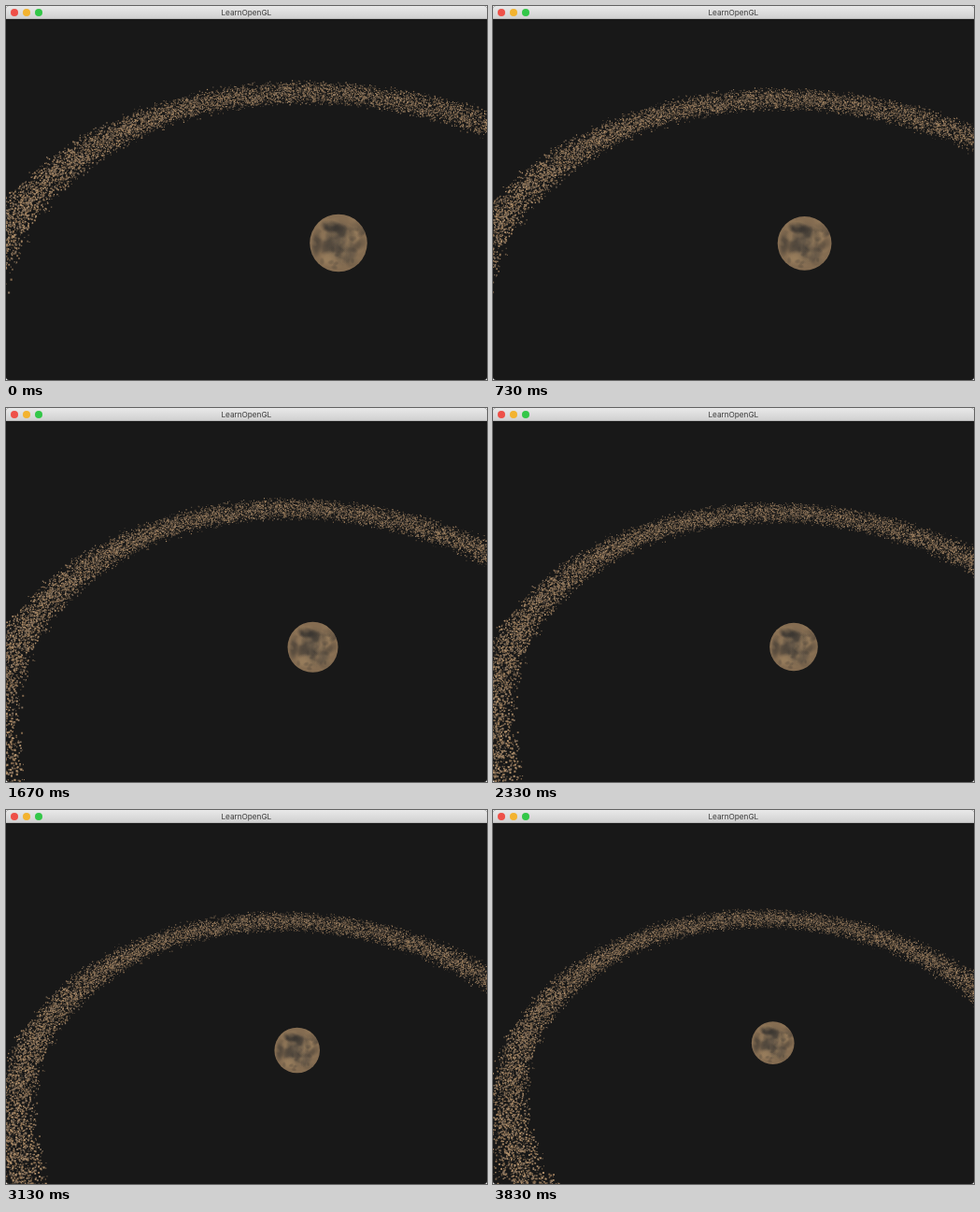
These frames come from a looping animation (515 by 400 pixels, 4010 ms). An HTML page with a canvas:

```html
<!DOCTYPE html>
<html lang="en">
<head>
<meta charset="utf-8">
<title>LearnOpenGL</title>
<style>
  html, body { margin: 0; width: 100%; height: 100%; overflow: hidden; background: #fff; }
  canvas { display: block; width: 515px; height: 400px; }
</style>
</head>
<body>
<canvas id="stage" width="515" height="400"></canvas>
<script>
const W = 515, H = 400, BAR = 14, LOOP = 4010;
const CX = W / 2, CY = (H + BAR) / 2;
const FOCAL = (H - BAR) / 2 / Math.tan(Math.PI / 8);
const RING = 50, SPREAD = 2.6, THICKNESS = 2.1, ROCKS = 20000;
const PLANET_RADIUS = 4.43, PLANET_DROP = 3;
const ctx = document.getElementById('stage').getContext('2d');

// time, planet x, planet y, planet diameter, camera elevation in degrees
const poses = [
  [0, 356, 253.5, 61.5, 41.6],
  [382, 335, 251.7, 59.2, 41.8],
  [1130, 331.8, 256.5, 56, 42.1],
  [1670, 328.5, 255.8, 54, 42.2],
  [2332, 322, 255.5, 51.6, 42.3],
  [3086, 311.7, 257, 48.6, 42.5],
  [3830, 299.7, 249.2, 45.7, 42.9]
];

// start, end and number of picture changes in each run of movement
const runs = [
  [70, 570, 9], [630, 1130, 7], [1200, 1470, 5], [1670, 2100, 8],
  [2270, 2770, 9], [2800, 3230, 7], [3400, 3830, 6]
];

function heldTime(t) {
  let held = 0;
  for (const [start, end, count] of runs) {
    if (t < start) break;
    const step = (end - start) / (count - 1);
    const k = Math.min(count - 1, Math.floor((t - start) / step + 0.1));
    held = start + k * step;
  }
  return held;
}

function poseAt(t) {
  let i = 0;
  while (i < poses.length - 2 && t >= poses[i + 1][0]) i++;
  const a = poses[i], b = poses[i + 1];
  const p = Math.min(1, (t - a[0]) / (b[0] - a[0]));
  return a.map((v, j) => v + (b[j] - v) * p);
}

let seed = 20117;
function random() {
  seed = (seed * 1664525 + 1013904223) >>> 0;
  return seed / 4294967296;
}
const jitter = amount => (random() * 2 - 1) * amount;

const shades = ['#6b5945', '#84694d', '#9a7c5c', '#b0906c', '#86725e'];
const rocks = Array.from({ length: ROCKS }, (_, i) => {
  const angle = i / ROCKS * Math.PI * 2;
  return {
    x: Math.sin(angle) * RING + jitter(SPREAD),
    y: jitter(THICKNESS),
    z: Math.cos(angle) * RING + jitter(SPREAD),
    size: 0.1 + random() * 0.18,
    shade: Math.floor(random() * shades.length)
  };
}).sort((a, b) => a.shade - b.shade);

// Camera whose view puts the planet at the given place and size.
function cameraFor([, px, py, diameter, degrees]) {
  const u = (px - CX) / FOCAL, v = (CY - py) / FOCAL;
  const n = Math.hypot(1, u, v);
  const elevation = degrees * Math.PI / 180;
  const distance = 2 * FOCAL * PLANET_RADIUS / diameter * n;
  const pitch = -Math.asin(n * Math.sin(elevation) / Math.hypot(1, v)) - Math.atan(v);
  const yaw = Math.atan2(u, Math.cos(pitch) - v * Math.sin(pitch));
  return {
    height: distance * Math.sin(elevation) - PLANET_DROP,
    back: distance * Math.cos(elevation),
    sinP: Math.sin(pitch), cosP: Math.cos(pitch),
    sinY: Math.sin(yaw), cosY: Math.cos(yaw)
  };
}

function drawRing(cam) {
  let shade = -1;
  for (const r of rocks) {
    const ahead = cam.back - r.z, rise = r.y - cam.height;
    const right = ahead * cam.sinY + r.x * cam.cosY;
    const forward = ahead * cam.cosY - r.x * cam.sinY;
    const depth = forward * cam.cosP + rise * cam.sinP;
    if (depth < 1) continue;
    const k = FOCAL / depth;
    const x = CX + right * k;
    const y = CY - (rise * cam.cosP - forward * cam.sinP) * k;
    if (x < -3 || x > W + 3 || y < BAR - 3 || y > H + 3) continue;
    if (r.shade !== shade) ctx.fillStyle = shades[shade = r.shade];
    const s = r.size * k;
    ctx.fillRect(x - s / 2, y - s / 2, s, s);
  }
}

const DARK = '48,46,44', GREY = '84,76,66', LIGHT = '158,130,95';

// x, y, width, height, tilt in planet radii, then colour and strength
const patches = [
  [0, 0, 0.55, 0.7, 0, GREY, 0.7],
  [-0.23, -0.56, 0.36, 0.2, 0.2, DARK, 0.95],
  [0.12, -0.42, 0.18, 0.26, -0.4, DARK, 0.6],
  [-0.75, 0, 0.17, 0.45, 0.1, DARK, 0.6],
  [-0.4, 0.1, 0.22, 0.3, 0.6, DARK, 0.5],
  [0.05, 0.3, 0.16, 0.4, 0.2, DARK, 0.4],
  [0.4, 0.45, 0.2, 0.3, 0.7, GREY, 0.5],
  [-0.3, 0.55, 0.32, 0.25, 0.1, LIGHT, 0.75],
  [0.48, -0.22, 0.26, 0.34, 0.4, LIGHT, 0.75],
  [-0.48, -0.25, 0.2, 0.18, 0, LIGHT, 0.5],
  [0.55, 0.62, 0.2, 0.12, -0.5, LIGHT, 0.5]
];
for (let i = 0; i < 60; i++) {
  const size = 0.06 + random() * 0.1;
  patches.push([jitter(0.9), jitter(0.9), size, size * 1.5, jitter(1.5), i % 2 ? DARK : LIGHT, 0.25]);
}

function drawPlanet([, x, y, diameter]) {
  ctx.save();
  ctx.translate(x, y);
  ctx.scale(diameter / 2, diameter / 2);
  ctx.beginPath();
  ctx.arc(0, 0, 1, 0, Math.PI * 2);
  ctx.fillStyle = '#846c51';
  ctx.fill();
  ctx.clip();
  for (const [px, py, rx, ry, tilt, rgb, strength] of patches) {
    const blob = ctx.createRadialGradient(0, 0, 0, 0, 0, 1.2);
    blob.addColorStop(0, `rgba(${rgb},${strength})`);
    blob.addColorStop(0.5, `rgba(${rgb},${strength * 0.75})`);
    blob.addColorStop(1, `rgba(${rgb},0)`);
    ctx.save();
    ctx.translate(px, py);
    ctx.rotate(tilt);
    ctx.scale(rx, ry);
    ctx.fillStyle = blob;
    ctx.fillRect(-1.2, -1.2, 2.4, 2.4);
    ctx.restore();
  }
  ctx.restore();
}

function drawTitleBar() {
  const metal = ctx.createLinearGradient(0, 0, 0, BAR);
  metal.addColorStop(0, '#e9e9e9');
  metal.addColorStop(1, '#cfcfcf');
  ctx.fillStyle = metal;
  ctx.fillRect(0, 0, W, BAR);
  ctx.fillStyle = '#a9a9a9';
  ctx.fillRect(0, BAR - 0.6, W, 0.6);
  ['#ee5048', '#f3b32f', '#33c748'].forEach((colour, i) => {
    ctx.beginPath();
    ctx.arc(9 + i * 13, 7, 4, 0, Math.PI * 2);
    ctx.fillStyle = colour;
    ctx.fill();
  });
  ctx.font = '8.2px Inter, Roboto, sans-serif';
  ctx.textAlign = 'center';
  ctx.fillStyle = '#3b3b3b';
  ctx.fillText('LearnOpenGL', 257.3, 10.2);
}

function draw(t) {
  const pose = poseAt(t);
  ctx.fillStyle = '#fff';
  ctx.fillRect(0, 0, W, H);
  ctx.save();
  ctx.beginPath();
  ctx.roundRect(0, 0, W, H, 3);
  ctx.clip();
  ctx.fillStyle = '#181818';
  ctx.fillRect(0, 0, W, H);
  drawRing(cameraFor(pose));
  drawPlanet(pose);
  drawTitleBar();
  ctx.restore();
}

let shown = -1;
const began = performance.now();
function tick() {
  const t = heldTime((performance.now() - began) % LOOP);
  if (t !== shown) draw(shown = t);
  requestAnimationFrame(tick);
}
tick();
</script>
</body>
</html>
```
